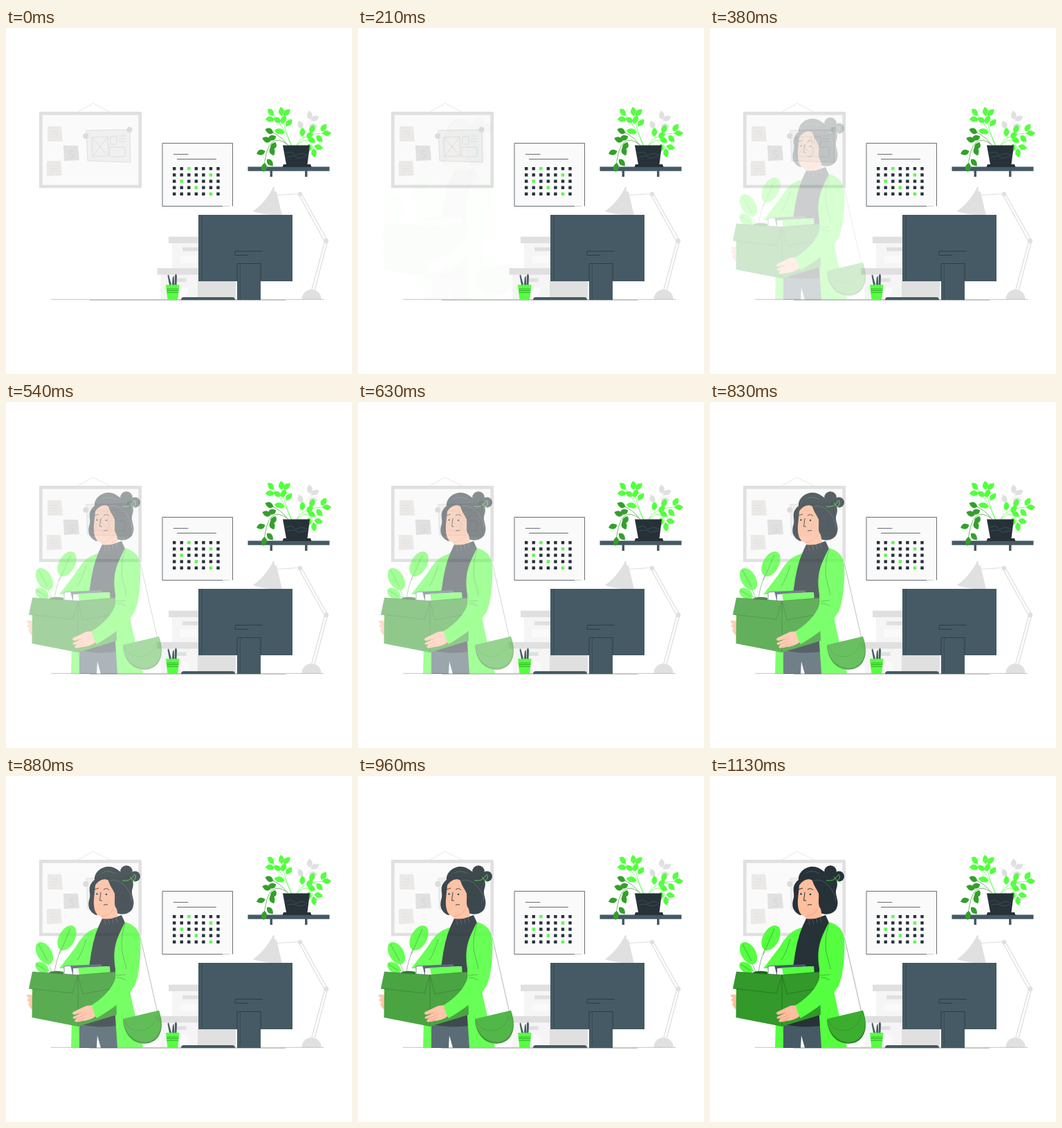
Animation of 500x500 px, one loop 1.21 s. Source, as an HTML page:

```html
<!DOCTYPE html>
<html lang="en">
<head>
<meta charset="utf-8">
<title>Leaving the office</title>
<style>
  html, body { margin: 0; width: 100%; height: 100%; overflow: hidden; background: #fff; }
  svg { display: block; width: 100vw; height: 100vh; }
  .slate { fill: #455a64; }
  .dark { fill: #263238; }
  .green { fill: #55ff40; }
  .box { fill: #32992a; }
  .skin { fill: #ffbe9d; }
  .grey { fill: #e0e0e0; }
  .light { fill: #f5f5f5; }
  .white { fill: #fafafa; }
  .line { fill: none; stroke-width: .7; stroke-linejoin: round; }
  .ink { stroke: #263238; }
  .pale { stroke: #ddd; }
  .seam { stroke: #268c20; stroke-width: .6; }
  .steel { stroke: #55656d; }
</style>
</head>
<body>
<svg viewBox="0 0 500 500">
  <!-- pin board -->
  <path class="line pale" d="M104 121L126 109L150 121"/>
  <path class="white" d="M50.3 123.3H193.700V229H50.300Z" stroke="#e0e0e0" stroke-width="4.700"/>
  <path d="M60 142H80L82 164H60ZM59 192H79L81 213L59 214Z" fill="#ebe9e7"/>
  <path class="grey" d="M83 170H104L106 191L84 192Z"/>
  <path class="line pale" style="stroke-width:10; stroke-dasharray:.7 3.500" d="M70 149V158M69 199V209"/>
  <path class="line" stroke="#ccc" d="M97 178C91 177 90 182 95 183C100 184 98 189 92 188"/>
  <path d="M116 148L179 147L180 194L118 192Z" fill="#f0f0f0" stroke="#d6d6d6" stroke-width=".7"/>
  <path class="line" stroke="#d6d6d6" d="M124 158L147 157L148 185L125 186ZL148 185M147 157L125 186M151 157H160V168H151ZM163 156H173M163 160H173M163 164H173M150 172H172V186H150Z"/>
  <g fill="#dcdcdc"><circle cx="115.300" cy="156" r="4"/><circle cx="178.500" cy="147" r="4"/></g>

  <!-- calendar -->
  <path class="white" d="M226 166.500H327.500V257.500H226Z"/>
  <path class="line ink" d="M313 257.500H226V166.500H327.500V257.500M242 182.500H263.500M247 189.500H304"/>
  <path class="line" stroke="#bbb" d="M313 257.500H323"/>
  <g id="days"></g>

  <!-- shelf and plant -->
  <path class="slate" d="M349.500 200.500H467.500V206.700H349.500ZM381.500 206H385V215H381.500ZM432 206H435.500V215H432Z"/>
  <g id="plant"></g>
  <path class="dark" d="M400 169.500H439L435.500 197H440L441.500 201H399.500L401 197H405Z"/>
  <path class="line" stroke="#455a64" d="M404 181L412 179L419 184L427 181L436 184M406 186L415 185L423 188L434 186"/>

  <!-- lamp -->
  <path class="line pale" style="stroke-width:1.200" d="M391 241.500L425 239.500M423.500 241.500L460 308M427 240L464 306M460.500 309L441.500 379M464.500 309L446 379"/>
  <path class="grey" d="M383.500 235L386.500 229.500L388 230.500L387.500 235L391 237L399 271Q376 271 356.500 265Q372 255 383.500 235Z"/>
  <circle class="grey" cx="425" cy="240" r="3.200"/><circle class="grey" cx="462.700" cy="307.700" r="3.500"/>
  <path class="grey" d="M427.500 392A14 14 0 0 1 455.500 392Z"/>

  <!-- storage boxes -->
  <path class="light" d="M240 311H279V347H240ZM223.500 356H279V392H223.500Z"/>
  <path class="grey" d="M235 301.500H279V311H235ZM218.500 347H279V356.500H218.500ZM255 317H279V322.500H255ZM240 361.500H260.500V367H240ZM277 365H332V392H277Z"/>
  <path class="white" d="M251 329H279V340H251ZM251 375H264V388H251Z"/>

  <!-- desk line -->
  <path class="line" stroke="#aaa" d="M65 392.300H459"/>
  <path class="line" stroke="#999" d="M121 393.200H404"/>

  <!-- computer -->
  <path class="slate" d="M278 270H414V366H368V393H334V366H278ZM253 393Q253 389 257 389H327Q331 389 331 393Z"/>
  <path class="line ink" d="M371 322.500H331V328.500H350M334 365V340.500H368V365"/>
  <path class="line ink" style="stroke-width:.4" d="M283 271V365M338.500 341V391"/>

  <!-- woman with box -->
  <g id="woman" opacity="0">
    <path class="line" stroke="#888" d="M194 232L219 342"/>
    <path class="slate" d="M104 355H162V393H137L132 375L131 393H104Z"/>
    <path class="green" d="M95 352L94 393H106V355ZM132 219C115 224 108 235 100 248L77 278H121L134 222Z"/>
    <path class="dark" d="M139 206Q154 206 167 201L172 212L160 250V361Q130 365 104 358L121 270Q125 238 133 219Z"/>
    <path class="line steel" style="stroke-width:7; stroke-dasharray:.7 5" d="M143 212L163 207"/>
    <!-- head -->
    <circle class="dark" cx="174" cy="138" r="8.800"/><circle class="dark" cx="186.500" cy="145" r="7.500"/>
    <path class="dark" d="M128 150C127 139 138 131 148 131C159 131 165 139 170 142C182 144 186 153 183 162C179 172 188 179 183 191C179 201 164 202 156 196L130 201C118 195 118 185 121 176C123 168 116 160 128 150Z"/>
    <path class="skin" d="M129 158C134 150 143 147 148 151C150 159 155 164 157 170C158 178 155 186 160 192L162 203Q150 208 138.500 206L137 203C129 201 126 191 127 178Z"/>
    <path class="line" stroke="#f08f70" d="M138 203Q149 202 155 193"/>
    <path class="line ink" style="stroke-width:1" d="M128 164L134 162M141 164Q146 161 149 165M137 168L135.500 180H139M141 186.500Q144 185 147 186"/>
    <circle class="dark" cx="131.500" cy="170.500" r="1.300"/><circle class="dark" cx="145" cy="171" r="1.300"/>
    <path class="line steel" d="M150 151Q161 148 171 158T182 181M139 140Q148 135 158 141"/>
    <path class="line" stroke="#55ff40" d="M168 151Q180 153 185 143Q188 141 187 148Q183 155 180 146M184 151L189 155"/>
    <!-- coat -->
    <path class="green" d="M172 211C189 216 194.500 226 194.500 243C194 273 191 291 186 303L179 309C184 340 192 363 198 393H161L158 348V278C153 247 161 233 172 211Z"/>
    <path class="line seam" d="M172 212Q163 242 170 263T172 291M116 236Q110 256 103 266M179 309L166 319"/>
    <!-- box contents -->
    <path class="line seam" d="M67 284L47 243M70 283Q74 255 93 221M67 284L44 272"/>
    <g class="green">
      <ellipse rx="19.500" ry="11.500" transform="translate(88 234) rotate(-62)"/>
      <ellipse rx="17.500" ry="10.500" transform="translate(55.500 256) rotate(60)"/>
      <ellipse rx="11" ry="7" transform="translate(52 277) rotate(35)"/>
    </g>
    <path class="line seam" d="M77 258L93 221M60 267L47 243M58 281L44 272"/>
    <path d="M62 284Q70 280 83 283V289H62Z" fill="#1d651a"/>
    <path class="white" d="M84 275L94 274L97 289H84Z" stroke="#455a64" stroke-width=".8"/>
    <path class="slate" d="M93 274L138 272V277L97 287Z"/>
    <path class="light" d="M97 278L148 275L151 287H97Z"/>
    <path class="green" d="M104 277L150 275L151 288H106Z"/>
    <!-- box -->
    <path class="skin" d="M39 316L30 316Q29 319 34 321L31 322Q30 325 34 327L32 330Q35 337 40 338Z"/>
    <path class="box" d="M38 283L104 287.500L158 283L160 345L104 362L37.500 349L38 308L33 307Z"/>
    <path class="line" style="stroke-width:.5" stroke="#1b5718" d="M33 307L96 314L104 287.500L111 315L160 306M104 287.500V361M38 283L104 287.500L158 283"/>
    <!-- arm and hand -->
    <path class="skin" d="M128 331L116 332L97 341Q94 344 99 345L108 343L97 348Q95 352 102 350L99 354Q101 357 110 354Q120 354 130 347Z"/>
    <path class="line" stroke="#e78b6d" d="M99 345L110 342M102 350L112 346M103 355L114 349"/>
    <path class="green" d="M160 283C158 301 146 317 124 331Q126 342 131 350C153 337 174 322 186 303L182 277Z"/>
    <path class="line seam" d="M158 283Q157 302 144 314M159 288L173 287M160 291Q168 291 173 295"/>
    <!-- bag -->
    <path d="M169 353L221 339C229 361 225 381 207 386C186 390 171 376 169 353Z" fill="#2b8424"/>
    <path d="M169 351L220 339C229 361 222 379 207 384C187 388 171 373 169 351Z" fill="#3bae30"/>
    <path class="line seam" d="M171 353C177 372 211 376 218 346"/>
  </g>

  <!-- pencil cup -->
  <path class="slate" d="M236 371L233.500 358L235 356L239 371ZM240 371L241 360L242.500 358L243.500 371ZM244 371V358L245.500 355L247 358L246.500 371Z"/>
  <path class="green" d="M231 371H250.500L248 393H233.500Z"/>
  <path class="line seam" style="stroke-width:17; stroke-dasharray:.7 1.800" d="M240.800 376.700V383"/>
</svg>
<script>
const byId = id => document.getElementById(id);
const GREEN = '#55ff40', DEEP = '#35a02c', GREY = '#e0e0e0';

// Seven columns, one marked day per row
byId('days').innerHTML = [2, 5, 1, 3, 5].map((marked, row) =>
  Array.from({ length: 7 }, (_, col) =>
    `<rect x="${241 + col * 10.55}" y="${201 + row * 9.15}" width="4.4" height="4.4" fill="${col === marked ? GREEN : '#263238'}"/>`
  ).join('')).join('');

// A curved stem from a to c, with a leaf at its tip and others on alternating sides below
function branch(color, a, b, c, count, side = 1) {
  let svg = `<path class="line" stroke="${color}" d="M${a}Q${b} ${c}"/>`;
  for (let i = 0; i < count; i++) {
    const t = 1 - .8 * i / count, u = 1 - t;
    const [x, y] = a.map((p, k) => u * u * p + 2 * u * t * b[k] + t * t * c[k]);
    const [dx, dy] = a.map((p, k) => u * (b[k] - p) + t * (c[k] - b[k]));
    const turn = i ? 55 * side * (-1) ** i : 0;
    const angle = Math.atan2(dy, dx) * 180 / Math.PI + turn;
    svg += `<path transform="translate(${x} ${y}) rotate(${angle})" fill="${color}"
      d="M${i ? 3 : -6} 0q5 -8 13 0q-6 8 -13 0Z"/>`;
  }
  return svg;
}

byId('plant').innerHTML =
  branch(GREY, [422, 168], [430, 140], [446, 131], 4) +
  branch(GREEN, [412, 170], [404, 145], [383, 122], 4) +
  branch(GREEN, [413, 170], [401, 145], [398, 121], 5, -1) +
  branch(GREEN, [420, 170], [428, 152], [463, 152], 6) +
  branch(GREEN, [420, 170], [440, 150], [445, 180], 4) +
  branch(DEEP, [406, 168], [398, 156], [381, 149], 2) +
  branch(DEEP, [408, 169], [378, 146], [373, 201], 6);

const LOOP = 1210, START = 210, STEP = 41.8, STEPS = 22;

// Stepped fade-in, slowing slightly towards full strength
function fade(time) {
  if (time < START) return 0;
  const step = Math.min(STEPS, Math.floor((time - START + 8) / STEP));
  return 1 - (1 - (step + .2) / (STEPS + .2)) ** 1.25;
}

const woman = byId('woman'), begin = performance.now();
function draw(now) {
  woman.setAttribute('opacity', fade(Math.max(0, now - begin) % LOOP));
  requestAnimationFrame(draw);
}
requestAnimationFrame(draw);
</script>
</body>
</html>
```
